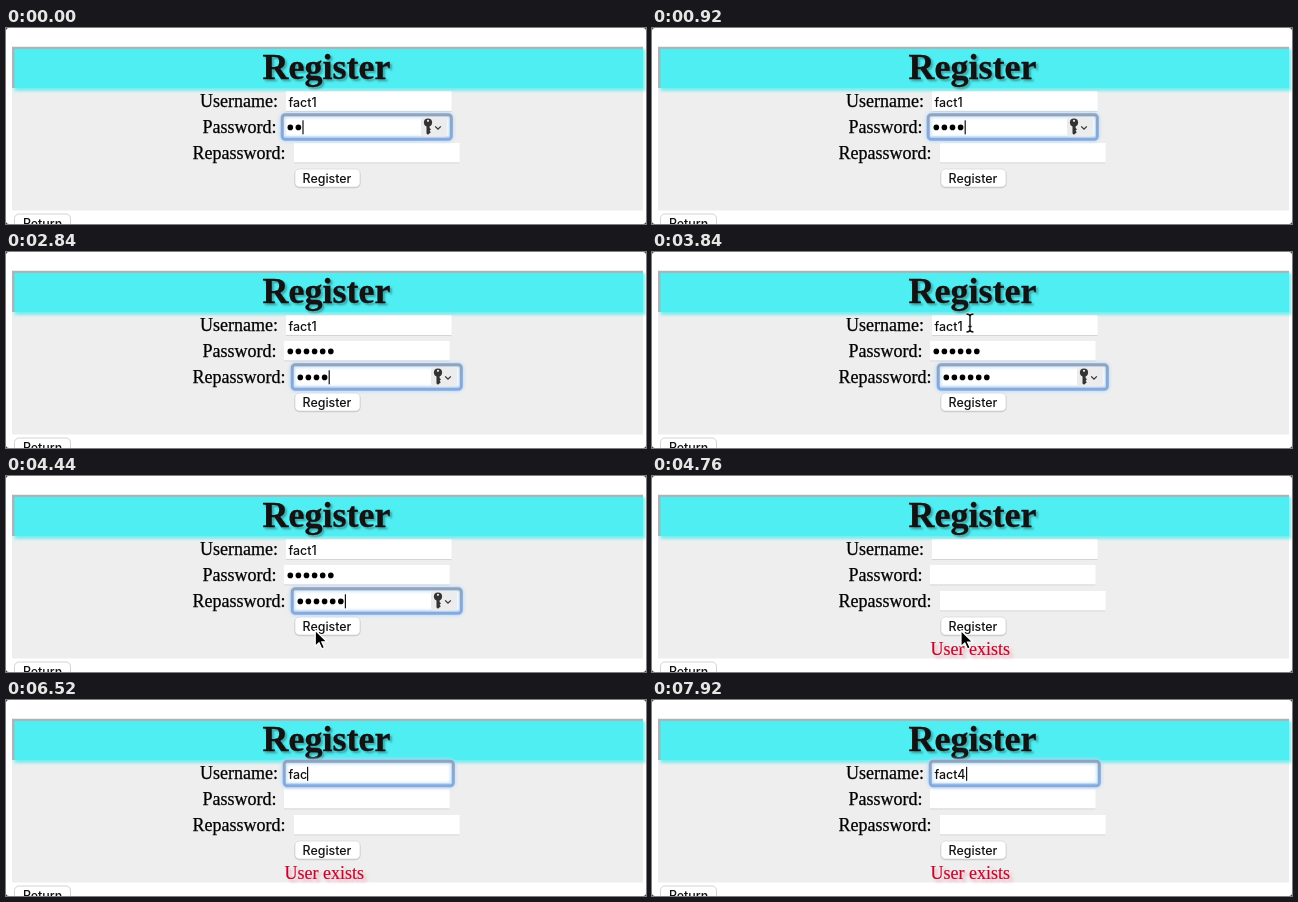
These frames come from a looping animation (640 by 196 pixels, 8000 ms). An HTML page:

```html
<!DOCTYPE html>
<html lang="en">
<head>
<meta charset="utf-8">
<title>Register form</title>
<style>
  html, body { margin: 0; width: 640px; height: 196px; overflow: hidden; background: #333; }
  svg { display: block; }
  .label { font: 18px "Liberation Serif", serif; fill: #000; stroke: #000; stroke-width: .25px; }
  .title { font: bold 36px "Liberation Serif", serif; fill: #111; stroke: #111; stroke-width: .3px;
           text-anchor: middle; text-shadow: 2px 2px 2px rgba(60, 80, 80, .45); }
  .error { font: 18px "Liberation Serif", serif; fill: #c0062c; stroke: #c0062c; stroke-width: .15px;
           text-shadow: 3px 3px 3px rgba(255, 130, 160, .5); }
  .ui { font: 500 12.4px Inter, "Liberation Sans", sans-serif; fill: #111; }
  .mid { text-anchor: middle; }
</style>
</head>
<body>
<svg id="stage" width="640" height="196" viewBox="0 0 640 196">
  <defs>
    <filter id="soft" x="-5%" y="-40%" width="110%" height="180%"><feGaussianBlur stdDeviation="1.6"/></filter>
    <filter id="edge" x="-5%" y="-40%" width="110%" height="180%"><feGaussianBlur stdDeviation=".6"/></filter>
    <clipPath id="banner"><rect x="6" y="18.5" width="631" height="41.5"/></clipPath>
    <linearGradient id="blue" x2="0" y2="1">
      <stop stop-color="#93a3bb"/><stop offset="1" stop-color="#86a9df"/>
    </linearGradient>
  </defs>
  <rect width="640" height="196" rx="3" fill="#fff"/>
  <rect x="6" y="60" width="631" height="122.5" fill="#eee"/>
  <rect x="8.5" y="21" width="631" height="42" fill="#4eeef2" opacity=".75" filter="url(#soft)"/>
  <g clip-path="url(#banner)">
    <rect x="6" y="18.5" width="631" height="41.5" fill="#aeb4b5"/>
    <rect x="8.5" y="21" width="640" height="50" fill="#4eeef2" filter="url(#edge)"/>
  </g>
  <text class="title" x="320.5" y="51.3">Register</text>
  <text class="label" x="194" y="79">Username:</text>
  <text class="label" x="196.5" y="105">Password:</text>
  <text class="label" x="186.5" y="131">Repassword:</text>
  <g id="fields"></g>
  <rect x="288.5" y="141.2" width="66" height="19" rx="5" fill="#000" opacity=".16"/>
  <rect x="289" y="141" width="65" height="18" rx="4.5" fill="#fff" stroke="#d6d6d6" stroke-width=".7"/>
  <text class="ui mid" x="321" y="155">Register</text>
  <rect x="8.5" y="186" width="56" height="19" rx="4.5" fill="#fff" stroke="#cfcfcf" stroke-width=".9"/>
  <text class="ui mid" x="36.5" y="200">Return</text>
  <text class="error" id="error" x="278.5" y="179">User exists</text>
  <g id="ring" fill="none">
    <rect stroke="#b4dcff" stroke-width="6" rx="4" opacity=".75" filter="url(#soft)"/>
    <rect stroke="url(#blue)" stroke-width="3" rx="3"/>
  </g>
  <g id="key">
    <rect x="-7" y="-10" width="26" height="19.5" rx="3" fill="#ececec"/>
    <circle cy="-4.4" r="4.1" fill="#333"/>
    <circle cy="-6.2" r="1.1" fill="#ececec"/>
    <path d="M-1.5 -2H1.6V1L3 2.3 1.6 3.8 2.8 5.2 0 7.8 -1.5 6.4Z" fill="#333"/>
    <path d="M7.2 -.6L10 2.2 12.8 -.6" fill="none" stroke="#333" stroke-width="1.3"/>
  </g>
  <rect id="caret" width="1.2" height="14" fill="#111"/>
  <g id="mouse">
    <path id="arrow" d="M0 0V16L3.8 12.5 6.5 18.5 9.2 17.3 6.5 11.5H11.7Z" fill="#000" stroke="#fff" stroke-width="1.2"/>
    <g id="beam" fill="none">
      <path d="M-3.5 -9Q0 -9 0 -6.5Q0 -9 3.5 -9M0 -6.5V6.5M-3.5 9Q0 9 0 6.5Q0 9 3.5 9" stroke="#fff" stroke-width="2.8" opacity=".7"/>
      <path d="M-3.5 -9Q0 -9 0 -6.5Q0 -9 3.5 -9M0 -6.5V6.5M-3.5 9Q0 9 0 6.5Q0 9 3.5 9M-1.6 3.5H1.6" stroke="#111" stroke-width="1.4"/>
    </g>
  </g>
</svg>
<script>
const LOOP = 8000, RELOAD = 4720, DOT = 8.1;
const NS = "http://www.w3.org/2000/svg";
const $ = id => document.getElementById(id);
const set = (el, attrs) => { for (const k in attrs) el.setAttribute(k, attrs[k]); return el; };
const add = (tag, attrs) => $("fields").appendChild(set(document.createElementNS(NS, tag), attrs));
const show = (el, on) => el.setAttribute("visibility", on ? "inherit" : "hidden");

const fields = [{ x: 280, y: 63 }, { x: 278, y: 88.5 }, { x: 288, y: 114.5 }];
const W = 165.5, H = 21;
const carets = [283, 287.5, 294.5, 301, 305.6, 314];

// time, focused field, characters typed
const steps = [
  [0, 1, 2], [200, 1, 3], [520, 1, 4], [960, 1, 5], [1200, 1, 6],
  [1400, 2, 0], [1960, 2, 1], [2320, 2, 2], [2600, 2, 3], [2800, 2, 4], [3200, 2, 5], [3320, 2, 6],
  [RELOAD, -1, 0],
  [5560, 0, 0], [6040, 0, 1], [6320, 0, 2], [6480, 0, 3], [6760, 0, 4], [7720, 0, 5]
];
const focusAt = [5560, -1000, 1400];

// time, x, y
const path = [
  [3680, 322, 74], [3840, 318, 71], [4400, 309.5, 154], [4480, 309, 154.5],
  [4880, 309, 154.5], [5320, 321, 73], [5400, 322, 73], [6040, 322, 73]
];

for (const f of fields) {
  add("rect", { x: f.x, y: f.y + .5, width: W, height: H - 1, fill: "#fff" });
  add("rect", { x: f.x, y: f.y + H - 1, width: W, height: .8, fill: "#ccc" });
}
const user = add("text", { class: "ui", x: 282.5, y: 78.6 });
const dots = [1, 2].map(i => Array.from({ length: 6 }, (_, n) =>
  add("circle", { cx: fields[i].x + 6.3 + n * DOT, cy: fields[i].y + 10.9, r: 2.8, fill: "#000" })));

function drawRing(t, focus) {
  show($("ring"), focus >= 0);
  if (focus < 0) return;
  const p = Math.min(1, (t - focusAt[focus] + 40) / 180);
  const grow = 1.8 + 5 * (1 - p) ** 2, f = fields[focus];
  const box = { x: f.x - grow, y: f.y - grow, width: W + 2 * grow, height: H + 2 * grow };
  for (const r of $("ring").children) set(r, box);
  set($("ring"), { opacity: p });
}

function drawMouse(t) {
  const on = t >= path[0][0] && t < path[path.length - 1][0];
  show($("mouse"), on);
  if (!on) return;
  const i = path.findIndex(p => p[0] > t);
  const [t0, x0, y0] = path[i - 1], [t1, x1, y1] = path[i];
  const u = (t - t0) / (t1 - t0), e = u * u * (3 - 2 * u);
  const x = x0 + (x1 - x0) * e, y = y0 + (y1 - y0) * e;
  const overField = fields.some(f => x > f.x && x < f.x + W && y > f.y && y < f.y + H);
  set($("mouse"), { transform: `translate(${x} ${y})` });
  show($("arrow"), !overField);
  show($("beam"), overField);
}

function draw(t) {
  const [since, focus, count] = steps.filter(s => s[0] <= t).pop();
  const fresh = t >= RELOAD;
  user.textContent = fresh ? "fact4".slice(0, focus === 0 ? count : 0) : "fact1";
  const typed = fresh ? [0, 0] : focus === 1 ? [count, 0] : [6, count];
  dots.forEach((row, r) => row.forEach((d, n) => show(d, n < typed[r])));
  show($("error"), fresh);
  drawRing(t, focus);

  show($("key"), focus > 0);
  if (focus > 0) set($("key"), { transform: `translate(${fields[focus].x + 144} ${fields[focus].y + 10.5})` });

  show($("caret"), focus >= 0 && (t - since) % 1000 < 500);
  if (focus >= 0) {
    const x = focus ? fields[focus].x + 2.2 + count * DOT : carets[count];
    set($("caret"), { x, y: fields[focus].y + 3.8 });
  }
  drawMouse(t);
}

const start = performance.now();
function tick() {
  draw((performance.now() - start) % LOOP);
  requestAnimationFrame(tick);
}
tick();
</script>
</body>
</html>
```
